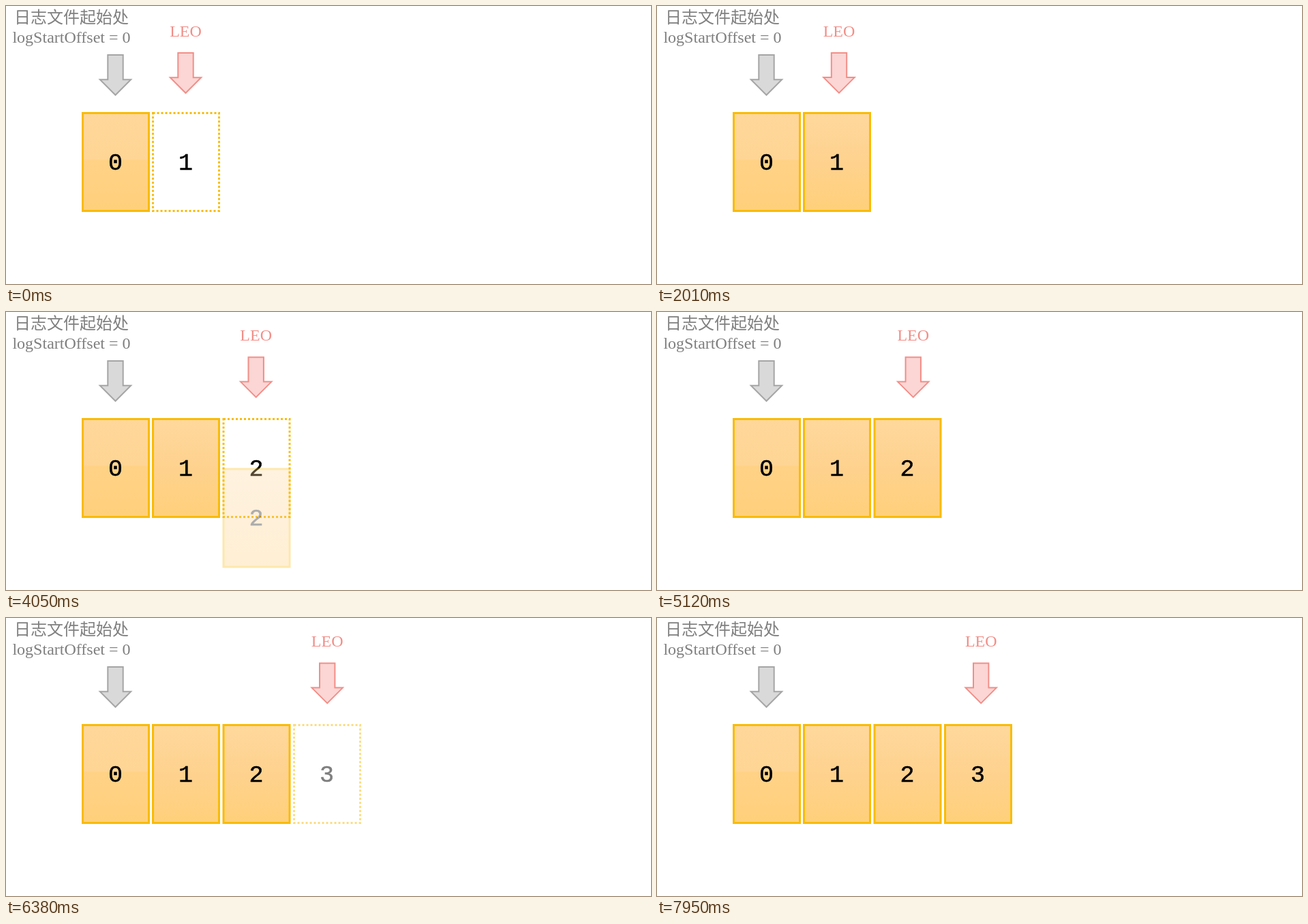
Animation, 946 px wide and 409 px high, one loop 8000 ms. Source, as an HTML page:

```html
<!DOCTYPE html>
<html lang="zh">
<head>
<meta charset="utf-8">
<title>LEO</title>
<style>
  html, body { margin: 0; width: 100%; height: 100%; overflow: hidden; background: #fff; }
  svg { display: block; width: 946px; height: 409px; }
  text { text-anchor: middle; }
  .label { font: 24px "Liberation Serif", "Times New Roman", serif; }
  .cjk { font: 24px "Noto Sans CJK SC", "Noto Sans CJK", sans-serif; }
  .digit { font: 35px "Liberation Mono", monospace; stroke: #000; stroke-width: .5; }
  .frame { stroke: #f9bb05; stroke-width: 3; }
  .dotted { fill: none; stroke-dasharray: 3 3; }
  .arrow { stroke-width: 2; }
</style>
</head>
<body>
<svg id="stage" viewBox="0 0 946 409">
  <defs>
    <linearGradient id="split" x2="0" y2="1">
      <stop offset="0" stop-color="#ffd79a"/>
      <stop offset=".475" stop-color="#fed594"/>
      <stop offset=".475" stop-color="#ffd287"/>
      <stop offset="1" stop-color="#ffd07b"/>
    </linearGradient>
    <linearGradient id="smooth" x2="0" y2="1">
      <stop offset="0" stop-color="#ffd89d"/>
      <stop offset=".5" stop-color="#fed28e"/>
      <stop offset="1" stop-color="#ffd07a"/>
    </linearGradient>
    <path id="arrow" d="M-11.2 0H11.2V36.2H22.7L0 59L-22.7 36.2H-11.2Z"/>
  </defs>
  <g fill="#7f7f7f">
    <text class="cjk" x="96" y="25">日志文件起始处</text>
    <text class="label" x="96" y="54">logStartOffset = 0</text>
  </g>
  <use class="arrow" href="#arrow" x="160.5" y="72" fill="#d9d9d9" stroke="#a5a5a5"/>
  <g id="slots"></g>
  <g id="leo">
    <text class="label" y="45" fill="#f28e88">LEO</text>
    <use class="arrow" href="#arrow" y="69" fill="#fbd6d4" stroke="#f28e88"/>
  </g>
</svg>
<script>
const LOOP = 8000;
const RISE = { duration: 860, distance: 108 };
const FADE = 500;
const MOVE = 1696;

// Start times: when the dotted slot fades in and when its record rises.
const slots = [
  { fade: -FADE, rise: -RISE.duration },
  { fade: -FADE, rise: 745 },
  { fade: 3117, rise: 3776 },
  { fade: 6130, rise: 6740 }
];
const moves = [
  { start: 1790, dx: 103.2, dy: -2.6 },
  { start: 4769, dx: 105, dy: 0 },
  { start: 7730, dx: 103.2, dy: 0 }
];

const progress = (t, start, duration) => Math.min(1, Math.max(0, (t - start) / duration));
const ease = u => u < .5 ? 2 * u * u : 1 - 2 * (1 - u) * (1 - u);

function addCell(index, className, fill) {
  const x = [111, 214, 317.5, 421][index];
  const cell = document.createElementNS("http://www.w3.org/2000/svg", "g");
  cell.innerHTML =
    `<rect class="frame ${className}" x="${x + 1.5}" y="157.5" width="97" height="144" fill="${fill}"/>` +
    `<text class="digit" x="${x + 49.5}" y="241">${index}</text>`;
  document.getElementById("slots").append(cell);
  return cell;
}

slots.forEach((slot, i) => {
  slot.dotted = addCell(i, "dotted", "none");
  slot.record = addCell(i, "", `url(#${i ? "smooth" : "split"})`);
});
const leo = document.getElementById("leo");

function draw(t) {
  for (const { fade, rise, dotted, record } of slots) {
    const risen = progress(t, rise, RISE.duration);
    dotted.setAttribute("opacity", risen < 1 ? progress(t, fade, FADE) : 0);
    record.setAttribute("opacity", risen);
    record.setAttribute("transform", `translate(0 ${RISE.distance * (1 - risen)})`);
  }
  let x = 263.5, y = 0;
  for (const { start, dx, dy } of moves) {
    const s = ease(progress(t, start, MOVE));
    x += dx * s;
    y += dy * s;
  }
  leo.setAttribute("transform", `translate(${x} ${y})`);
}

const origin = performance.now();
function tick() {
  draw((performance.now() - origin) % LOOP);
  requestAnimationFrame(tick);
}
draw(0);
requestAnimationFrame(tick);
</script>
</body>
</html>
```
